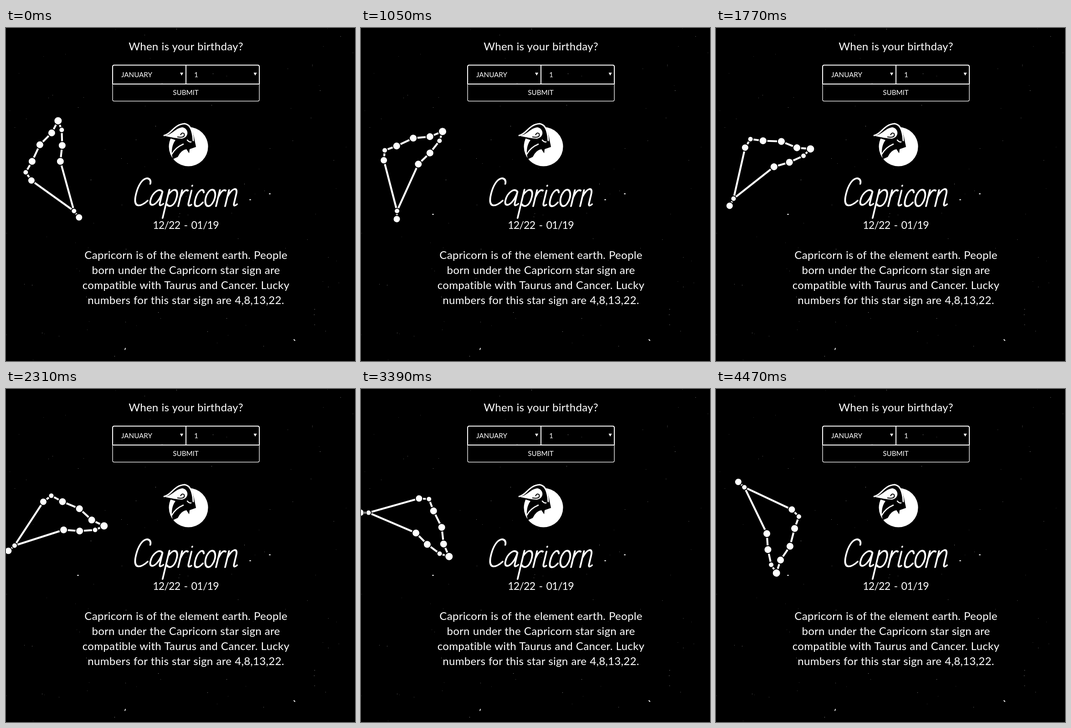
An HTML page that plays this animation: 766 px wide and 731 px high, repeating every 4.5 s.

```html
<!DOCTYPE html>
<html lang="en">
<head>
<meta charset="utf-8">
<title>Star sign</title>
<style>
  html, body { margin: 0; width: 100%; height: 100%; overflow: hidden; background: #000; }
  svg { display: block; width: 766px; height: 731px; }
  text { font-family: Lato, "Open Sans", sans-serif; fill: #fff; }
  .body { font-size: 24px; letter-spacing: .3px; word-spacing: .5px; text-anchor: middle; }
  .date { font-size: 23px; letter-spacing: -.7px; word-spacing: 3px; text-anchor: middle; }
  .field { font-size: 15.2px; }
  .mid { text-anchor: middle; }
  .line { fill: none; stroke: #fff; stroke-linecap: round; stroke-linejoin: round; }
</style>
</head>
<body>
<svg viewBox="0 0 766 731" xmlns="http://www.w3.org/2000/svg">
  <rect width="766" height="731"/>
  <g id="sky" fill="#fff"></g>
  <path class="line" stroke-width="1.8" d="M535 377h2M578 364h2M157 409h2M632 684l2 2M262 703l-1 3"/>

  <text class="body" x="395" y="49">When is your birthday?</text>

  <g class="line" stroke-width="2">
    <path d="M234 123V85q0-3.500 3.500-3.500h315q3.500 0 3.500 3.500V123ZM395 82V123"/>
    <path stroke-width="1.500" stroke="#ddd" d="M234 123v34q0 3.500 3.500 3.500h315q3.500 0 3.500-3.500V123"/>
  </g>
  <path fill="#fff" d="M382 98h7l-3.500 6.500zM543.500 98h7l-3.500 6.500z"/>
  <text class="field" x="253" y="108">JANUARY</text>
  <text class="field" x="413" y="108">1</text>
  <text class="field mid" x="394.500" y="147">SUBMIT</text>

  <!-- goat emblem: disc, head, horn, ear, neck -->
  <circle cx="400.500" cy="260.500" r="43" fill="#fff"/>
  <path d="M348 238C366 232 366 211 392 208C409 211 412 236 417 261L403 266L402 275L396 266Q384 268 377 283L366 288Q360 262 372 246Z"/>
  <path class="line" stroke-width="3" d="M347 236C364 232 368 212 392 210C406 212 410 228 411 247"/>
  <path fill="#fff" d="M349 237C368 232 372 219 388 218C402 222 402 240 386 243Q370 242 349 237Z"/>
  <path fill="none" stroke="#000" stroke-width="2" d="M376 239Q394 242 391 232Q386 228 383 235"/>
  <path class="line" stroke-width="2.500" d="M398 246Q402 251 406 250M364 277Q372 262 389 255"/>

  <!-- handwritten name, upright strokes on a slanted baseline -->
  <g role="img" aria-label="Capricorn" class="line" stroke-width="3.800" transform="translate(0 391) skewX(-13.5)">
    <path d="M305-49C305-66 279-70 279-26C279 6 297 2 308-12"/>
    <path d="M336-31C328-42 314-30 314-13C314 5 333 0 336-31V-6Q337 2 344-5"/>
    <path d="M350-36V26M350-24C356-40 370-40 370-20C370 2 358 4 350-6"/>
    <path id="r" d="M378-35V0M378-18Q382-39 391-34"/>
    <path d="M399-34V-6Q400 2 406-3M398-45v.5"/>
    <path d="M427-30C423-42 412-34 412-14C412 6 424 2 430-8"/>
    <ellipse cx="444" cy="-18" rx="10" ry="18"/>
    <use href="#r" x="83"/>
    <path d="M481-35V0M481-20C486-40 499-44 499-26V-5Q500 2 506-4"/>
  </g>

  <text class="date" x="394.500" y="441">12/22 - 01/19</text>
  <g class="body">
    <text x="395" y="507">Capricorn is of the element earth. People</text>
    <text x="395" y="540">born under the Capricorn star sign are</text>
    <text x="395" y="573">compatible with Taurus and Cancer. Lucky</text>
    <text x="395" y="606">numbers for this star sign are 4,8,13,22.</text>
  </g>

  <g id="signStars"></g>
</svg>
<script>
const LOOP = 4500, STEP = 30, SPEED = 0.03793; // ms, ms, degrees per ms
const CX = 114.3, CY = 304.7;

const make = (parent, tag, attrs) => {
  const el = document.createElementNS("http://www.w3.org/2000/svg", tag);
  for (const k in attrs) el.setAttribute(k, attrs[k]);
  return parent.appendChild(el);
};

let seed = 7;
const rand = () => (seed = (seed * 16807) % 2147483647) / 2147483647;
const sky = document.getElementById("sky");
for (let i = 0; i < 110; i++) {
  make(sky, "rect", {
    x: Math.floor(rand() * 766), y: Math.floor(rand() * 731),
    width: 1, height: 1, opacity: 0.2 + 0.6 * rand() ** 2
  });
}

// stars of the sign: x, y from the pivot, radius
const stars = [
  [0, -101, 8], [8, -81, 5], [9, -47, 7.5], [5, -12, 7.5],
  [35, 97, 5], [46, 111, 7], [-58.5, 30, 7], [-71, 12, 5],
  [-57, -12, 7.5], [-40, -48.5, 7.5], [-14, -74.5, 7.5]
];
const sign = document.getElementById("signStars");
const route = list => "M" + list.map(i => stars[i].slice(0, 2)).join("L");
make(sign, "path", {
  d: route([0, 1, 2, 3, 4, 5]) + route([4, 6, 7, 8, 9, 10, 0]),
  fill: "none", stroke: "#fff", "stroke-width": 4.2
});
for (const [cx, cy, r] of stars) {
  make(sign, "circle", { cx, cy, r: r + 1, fill: "#fff", stroke: "#000", "stroke-width": 2 });
}

function draw(ms) {
  const t = Math.floor((ms % LOOP) / STEP) * STEP;
  sign.setAttribute("transform", `translate(${CX} ${CY}) rotate(${t * SPEED})`);
}

let start = null;
function tick(now) {
  if (start === null) start = now;
  draw(now - start);
  requestAnimationFrame(tick);
}
draw(0);
requestAnimationFrame(tick);
</script>
</body>
</html>
```
